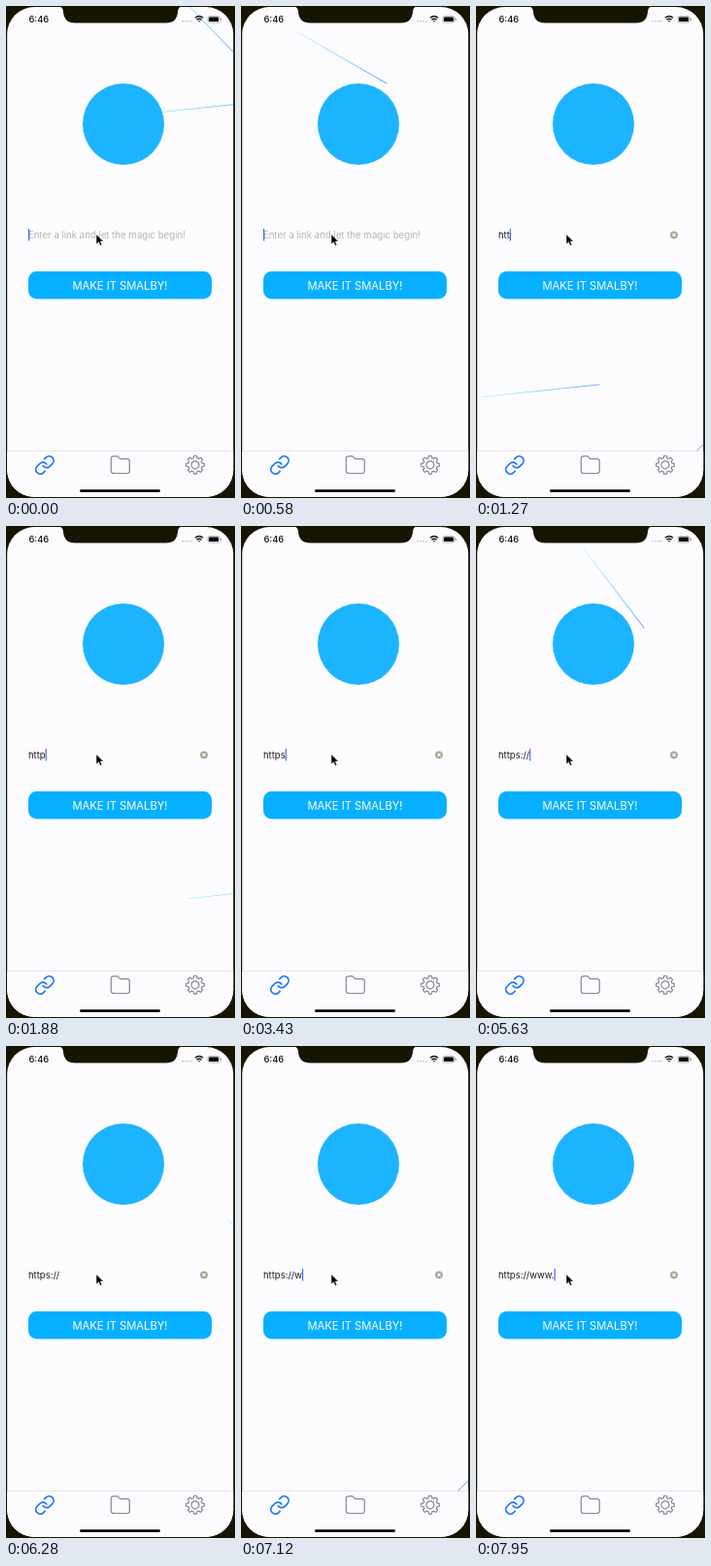
These frames come from a looping animation (236x508 px, 8000 ms). An HTML page:

```html
<!DOCTYPE html>
<html lang="en">
<head>
<meta charset="utf-8">
<title>Link shortener</title>
<style>
  html, body { margin: 0; width: 100%; height: 100%; overflow: hidden; background: #171502; }
  svg { display: block; width: 100%; height: 100%; }
  text { font-family: Inter, Roboto, sans-serif; }
  .field { font-size: 9.5px; }
  .icon { fill: none; stroke: #858690; stroke-width: 1.2; stroke-linecap: round; stroke-linejoin: round; }
</style>
</head>
<body>
<svg viewBox="0 0 236 508">
  <defs>
    <linearGradient id="trail">
      <stop offset="0" stop-color="#5fe0ff" stop-opacity=".4"/>
      <stop offset=".5" stop-color="#4cc4ff" stop-opacity=".75"/>
      <stop offset="1" stop-color="#4d8fff"/>
    </linearGradient>
    <clipPath id="screen"><rect x="1.2" y="1" width="233" height="506" rx="28"/></clipPath>
  </defs>

  <g clip-path="url(#screen)">
    <rect width="236" height="508" fill="#fcfcfe"/>
    <g id="stars"></g>
    <circle cx="121" cy="122" r="42" fill="#1cb4ff"/>

    <text class="field" id="hint" x="23" y="239.5" style="font-size:9.8px" font-weight="300" fill="#a3a3a8">Enter a link and let the magic begin!</text>
    <text class="field" id="typed" x="23" y="239.5" fill="#1d1d22"></text>
    <rect id="caret" y="230" width="1.1" height="12.5" fill="#3f5fe8"/>
    <g id="clear">
      <circle cx="204" cy="236.3" r="3.9" fill="#a5a596"/>
      <path d="M202.4 234.7l3.2 3.2m0-3.2l-3.2 3.2" stroke="#fff" stroke-width="1.1"/>
    </g>

    <rect x="23" y="274" width="189" height="28.5" rx="8.5" fill="#06afff"/>
    <text x="117.5" y="292.5" font-size="11.2" text-anchor="middle" fill="#fff">MAKE IT SMALBY!</text>

    <rect y="460" width="236" height="48" fill="#fcfcfe"/>
    <path d="M0 459.5H236" stroke="#e0e0ea" stroke-width=".8"/>
    <g class="icon" style="stroke:#1272fa;stroke-width:1.8" transform="translate(28.9 462.9) scale(.92)">
      <path d="M10 13a5 5 0 0 0 7.54.54l3-3a5 5 0 0 0-7.07-7.07l-1.72 1.71"/>
      <path d="M14 11a5 5 0 0 0-7.54-.54l-3 3a5 5 0 0 0 7.07 7.07l1.71-1.71"/>
    </g>
    <path class="icon" d="M108.3 467.3q0-2.5 2.5-2.5h4.3l2.5 2.9h7.2q2.5 0 2.5 2.5v9.8q0 2.5-2.5 2.5h-14q-2.5 0-2.5-2.5z"/>
    <g class="icon" transform="translate(195 473.8)">
      <path id="gear"/>
      <circle r="4"/>
    </g>
    <rect x="76" y="499.3" width="83" height="2.6" rx="1.3"/>

    <text x="23.4" y="17" font-size="9.4" font-weight="500" fill="#111">6:46</text>
    <path d="M182.3 15.8h9" stroke="#a5a5ad" stroke-width="1.5" stroke-linecap="round" stroke-dasharray="0 2.8"/>
    <g fill="none" stroke="#111" stroke-width="1.4">
      <path d="M194.9 12.2q4.1-3.6 8.2 0M196.5 14.2q2.5-2.1 5 0"/>
      <path d="M197.7 15.2h2.6l-1.3 1.6z" fill="#111" stroke="none"/>
      <rect x="208" y="10.6" width="12" height="6.4" rx="1.8" stroke="#88888c" stroke-width=".7"/>
    </g>
    <rect x="209" y="11.6" width="10" height="4.4" rx="1"/>
    <path d="M221.3 12.6v2.4" stroke="#88888c"/>
  </g>
  <path d="M54 0Q59 1 59 6Q60 17.5 71 17.5H165Q176 17.5 177 6Q177 1 182 0Z" fill="#171502"/>
  <path transform="translate(93 235.7) scale(.9)" d="M0 0V11.5L2.7 9L4.5 13L6.5 12.1L4.7 8.2H8.3Z" stroke="#fff" stroke-width=".6"/>
</svg>

<script>
const LOOP = 8000, SPEED = 0.3;
const $ = id => document.getElementById(id);

// Each star: a point its head crosses, the time it does so, heading in degrees, trail length
const stars = [
  { x: 252, y: 99.9, at: 0, angle: -6, size: 122 },
  { x: 236, y: 49.3, at: 0, angle: 46, size: 104 },
  { x: 15, y: 2, at: 60, angle: 30, size: 104 },
  { x: 127, y: 391, at: 1270, angle: -6, size: 122 },
  { x: 236, y: 451, at: 1270, angle: -45, size: 90 },
  { x: 190, y: 0, at: 2520, angle: 46, size: 104 },
  { x: 173, y: 105, at: 5630, angle: 52.8, size: 104 },
  { x: 234, y: 449, at: 7120, angle: -45, size: 104 }
];
for (const s of stars) {
  s.el = document.createElementNS("http://www.w3.org/2000/svg", "rect");
  s.el.setAttribute("width", s.size);
  s.el.setAttribute("height", 0.8);
  s.el.setAttribute("fill", "url(#trail)");
  $("stars").append(s.el);
}

function moveStar({ el, x, y, at, angle, size }, t) {
  const shift = (t - at) * SPEED - size;
  el.setAttribute("transform", `translate(${x} ${y}) rotate(${angle}) translate(${shift} -.4)`);
  el.style.display = Math.abs(t - at) < 1300 ? "" : "none";
}

const link = "https://www.";
const keyTimes = [640, 860, 1080, 1830, 2750, 3690, 5100, 5350, 6900, 7300, 7550, 7850];

// Solid after a key press, then fades out, rests and fades back in
function caretOpacity(idle) {
  if (idle < 680) return 1;
  const p = (idle - 680) % 1240;
  if (p < 180) return 1 - p / 180;
  if (p < 560) return 0;
  return Math.min(1, (p - 560) / 180);
}

function gearPath(teeth) {
  const step = 2 * Math.PI / teeth;
  const corners = [[-.34, 7.2], [-.2, 9.4], [.2, 9.4], [.34, 7.2]];
  const points = [];
  for (let i = 0; i < teeth; i++)
    for (const [turn, r] of corners) {
      const a = (i + turn) * step;
      points.push(`${(r * Math.cos(a)).toFixed(2)} ${(r * Math.sin(a)).toFixed(2)}`);
    }
  return `M${points.join("L")}Z`;
}
$("gear").setAttribute("d", gearPath(8));

function draw(now) {
  const t = now % LOOP;
  for (const s of stars) moveStar(s, t);

  const count = keyTimes.filter(k => k <= t).length;
  const typed = $("typed");
  const text = link.slice(0, count);
  if (typed.textContent !== text) typed.textContent = text;
  $("hint").style.display = count ? "none" : "";
  $("clear").style.display = count ? "" : "none";
  $("caret").setAttribute("x", 23 + (count ? typed.getComputedTextLength() : 0));
  $("caret").setAttribute("opacity", caretOpacity(count ? t - keyTimes[count - 1] : t));
}

const start = performance.now();
function tick() {
  draw(performance.now() - start);
  requestAnimationFrame(tick);
}
tick();
</script>
</body>
</html>
```
